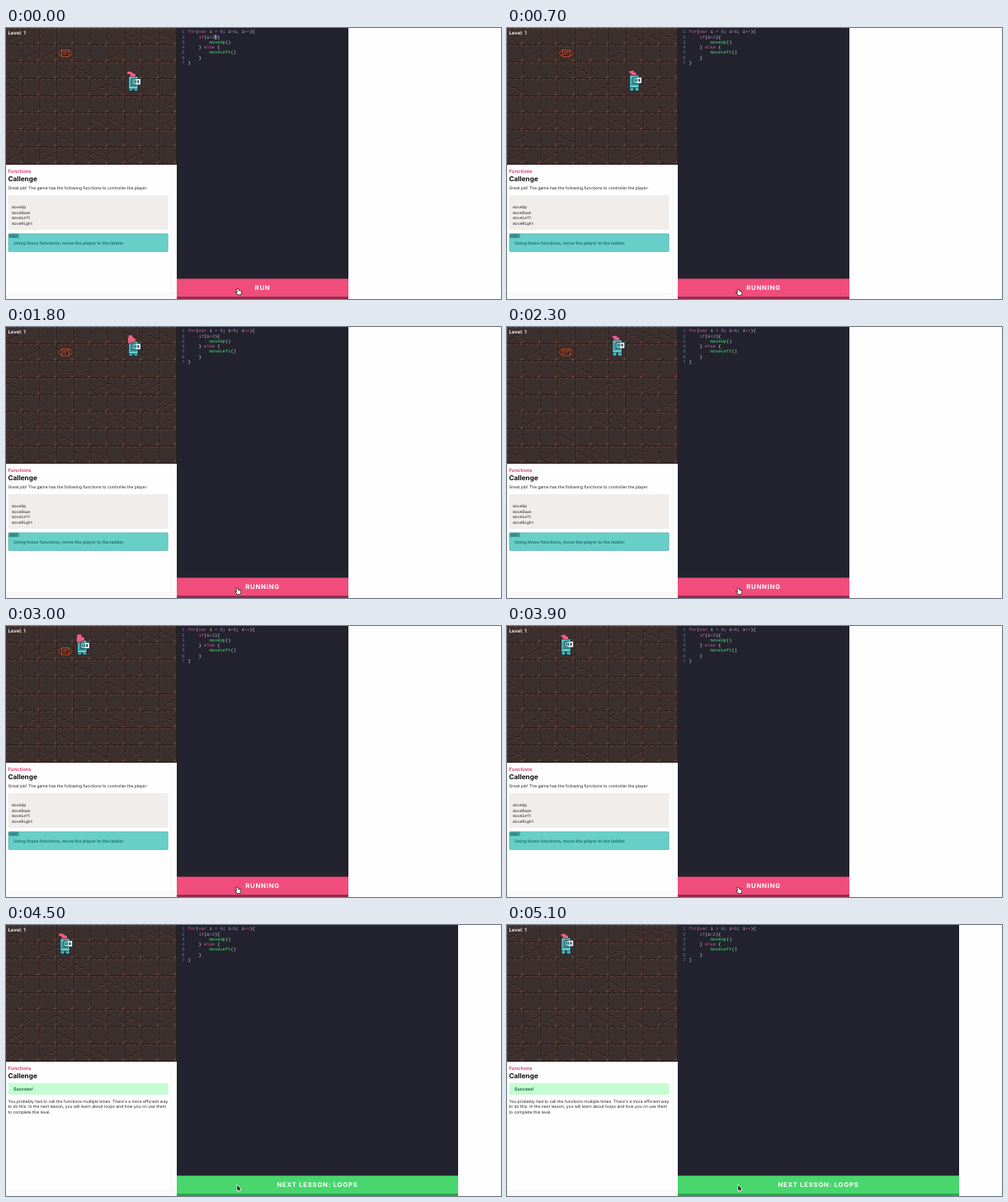
These frames come from a looping animation (600 by 329 pixels, 5.2 s). An HTML page with a canvas:

```html
<!DOCTYPE html>
<html lang="en">
<head>
<meta charset="utf-8">
<title>Coding lesson</title>
<style>
  html, body { margin: 0; width: 100%; height: 100%; overflow: hidden; background: #fff; }
  canvas { display: block; width: 600px; height: 329px; }
</style>
</head>
<body>
<canvas id="stage"></canvas>
<script>
const LOOP = 5200, CLICK = 600, FIRST_MOVE = 1000, MOVE_GAP = 500, DONE = 4000;
const TILE = 20.7, COLS = 10, ROWS = 8, MAP_W = 207, MAP_H = 166;
const SANS = 'Inter, sans-serif';
const CODE = '"Liberation Mono", monospace';
const MENLO = '"DejaVu Sans Mono", monospace';

const stage = document.getElementById('stage');
const dpr = window.devicePixelRatio || 1;
stage.width = 600 * dpr;
stage.height = 329 * dpr;
const screen = stage.getContext('2d');
let ctx = screen;

function rect(x, y, w, h, color) {
  ctx.fillStyle = color;
  ctx.fillRect(x, y, w, h);
}

function box(x, y, w, h, color, border) {
  ctx.beginPath();
  ctx.roundRect(x, y, w, h, 1);
  ctx.fillStyle = color;
  ctx.fill();
  if (border) {
    ctx.strokeStyle = border;
    ctx.lineWidth = 0.6;
    ctx.stroke();
  }
}

function trace(points, x = 0, y = 0) {
  ctx.beginPath();
  points.forEach(([dx, dy]) => ctx.lineTo(x + dx, y + dy));
}

function line(points, x, y, color, width) {
  trace(points, x, y);
  ctx.strokeStyle = color;
  ctx.lineWidth = width;
  ctx.stroke();
}

function shape(points, x, y, color, border) {
  trace(points, x, y);
  ctx.closePath();
  if (border) {
    ctx.strokeStyle = border;
    ctx.lineWidth = 1.4;
    ctx.stroke();
  }
  ctx.fillStyle = color;
  ctx.fill();
}

function text(str, x, y, font, color, align = 'left', spacing = 0) {
  ctx.font = font;
  ctx.textAlign = align;
  ctx.letterSpacing = spacing + 'px';
  ctx.textRendering = 'geometricPrecision';
  ctx.fillStyle = color;
  ctx.fillText(str, x, y);
}

function seeded(seed) {
  return () => {
    seed = (seed * 16807) % 2147483647;
    return seed / 2147483647;
  };
}

const CRACK = [[0, 6], [4, 7.5], [6, 10.5], [10, 10], [12, 13], [16, 14], [20, 18]];

function drawTile(x, y, rnd) {
  rect(x, y + TILE - 0.9, TILE, 0.9, '#231a19');
  rect(x + TILE - 0.8, y, 0.8, TILE, '#271d1c');
  // Broken, rust-coloured rims along the joints
  for (let i = 0; i < 3; i++) {
    rect(x + 1 + i * 7, y + 0.1, 4.5, 0.8, '#6a473d');
    rect(x + 0.1, y + 1 + i * 7, 0.7, 4, '#5b3f37');
  }
  rect(x + TILE - 4.5, y + TILE - 2.2, 3.5, 0.8, '#835344');
  rect(x + TILE - 2, y + TILE - 5, 0.8, 3, '#74493e');
  rect(x + 2, y + TILE - 3, 2, 0.8, '#241b1a');
  rect(x + 3 + rnd() * 13, y + 3 + rnd() * 12, 1.2, 0.8, '#523d37');
  if (rnd() < 0.36) {
    const flip = rnd() < 0.5;
    const crack = CRACK.map(([a, b]) => [flip ? TILE - a : a, b]);
    line(crack, x, y, '#201818', 1);
    line(crack, x, y + 0.9, '#70493d', 0.6);
  }
}

// Stone floor, painted once
function makeFloor() {
  const layer = document.createElement('canvas');
  layer.width = MAP_W * dpr;
  layer.height = MAP_H * dpr;
  ctx = layer.getContext('2d');
  ctx.scale(dpr, dpr);
  rect(0, 0, MAP_W, MAP_H, '#3c302e');
  const rnd = seeded(77);
  for (let row = 0; row < ROWS; row++) {
    for (let col = 0; col < COLS; col++) drawTile(col * TILE, row * TILE, rnd);
  }
  ctx = screen;
  return layer;
}

const floor = makeFloor();

function drawLadder() {
  const x = 3 * TILE, y = TILE;
  rect(x + 4, y + 4.6, 11.6, 11, '#281b19');
  for (const side of [-1, 1]) {
    const hook = [[5, -3.5], [7.5, -1.5], [8.3, 0], [7.5, 2], [5, 4]].map(([a, b]) => [a * side, b]);
    line(hook, x + 9.7, y + 9.6, '#281b19', 2.4);
    line(hook, x + 9.7, y + 9.6, '#a04a31', 1.1);
  }
  rect(x + 4.8, y + 5.2, 10, 9.6, '#b94d32');
  rect(x + 6, y + 6.4, 7.6, 7.2, '#35201c');
  rect(x + 7, y + 7.8, 5.6, 1.1, '#c65b3d');
  rect(x + 7, y + 10.4, 4.2, 1.1, '#b04d34');
}

// Idle cycle: vertical bob and plume outline per pose
const SWEPT = [[2, -6], [6, -6.2], [9, -4.2], [12, -2.8], [12, 0], [6, 0], [5.5, -2.6], [2, -3.4]];
const RAISED = [[4, -7.5], [8, -7.5], [9, -4.5], [12, -3.5], [12, 0], [3, 2.5], [3, -3]];
const SHORT = [[3.5, -5], [9, -5.5], [9, -3.6], [12, -2.8], [12, 0], [5.5, 0], [5.5, -2.4], [3.5, -2.6]];
const POSES = [
  { bob: 0, plume: SWEPT },
  { bob: -1, plume: SWEPT },
  { bob: 0, plume: RAISED },
  { bob: -1.6, plume: SHORT }
];

function drawPlayer(col, row, t) {
  const { bob, plume } = POSES[Math.floor(t / 100) % 4];
  const x = col * TILE, y = row * TILE, top = y - 3.2 + bob;
  const part = (dx, dy, w, h, color) => rect(x + dx, top + dy, w, h, color);
  rect(x + 3.4, y + 10, 12.4, 5, '#1d2429');
  rect(x + 4.4, y + 10, 4, 4, '#4db4b9');
  rect(x + 10.4, y + 10, 4.4, 4, '#4db4b9');
  part(3.2, -0.6, 12.4, 16, '#1d2c32');
  part(4.2, 0.2, 10.4, 14.6, '#62d2d4');
  part(5.4, 3, 1.2, 8.6, '#2d7f88');
  part(5.4, 11, 8.4, 1.1, '#246a73');
  part(7.4, 2.2, 11.4, 8.2, '#1a333b');
  part(8.4, 3.2, 9.6, 6.2, '#74dadb');
  part(12.6, 3, 5.4, 6.6, '#f3fbfb');
  part(9.8, 4.5, 1.1, 3.4, '#20434b');
  part(12, 4.5, 1.1, 3.4, '#20434b');
  part(14.4, 4.5, 2, 3.4, '#28434d');
  shape(plume, x, top, '#ec5f83', '#38222a');
}

const PINK = '#e75c9c', PLAIN = '#dfdfe6', VIOLET = '#a98be0', GREEN = '#4ee37b';
const SOURCE = [
  [0, ['for', PINK], ['(', PLAIN], ['var', PINK], [' i ', PLAIN], ['=', PINK], [' ', PLAIN], ['0', VIOLET],
    ['; i', PLAIN], ['<', PINK], ['6', VIOLET], ['; i', PLAIN], ['++', PINK], ['){', PLAIN]],
  [4, ['if', PINK], ['(i', PLAIN], ['<', PINK], ['2', VIOLET], ['){', PLAIN]],
  [8, ['moveUp', GREEN], ['()', PLAIN]],
  [4, ['} ', PLAIN], ['else', PINK], [' {', PLAIN]],
  [8, ['moveLeft', GREEN], ['()', PLAIN]],
  [4, ['}', PLAIN]],
  [0, ['}', PLAIN]]
];

function drawEditor(t) {
  const done = t >= DONE, left = MAP_W, width = done ? 341 : 208;
  rect(left, 0, width, 329, '#22232e');
  if (t < CLICK) rect(252.8, 8, 2.8, 5.4, '#4a4b58');
  const charWidth = 3.25, font = '5.42px ' + CODE;
  SOURCE.forEach(([indent, ...runs], i) => {
    const y = 6.3 + i * 6.25;
    text(String(i + 1), 216.6, y, font, '#7d7e89', 'right');
    let column = indent;
    for (const [word, color] of runs) {
      text(word, 220.4 + column * charWidth, y, font, color);
      column += word.length;
    }
  });
  if (t < CLICK) rect(253, 8, 0.5, 5.4, '#d8d8de');

  rect(left, 304.5, width, 24.5, done ? '#2ba44e' : '#8f2a4c');
  rect(left, 304.5, width, 21.7, done ? '#48d66d' : '#f04d7c');
  const label = done ? 'NEXT LESSON: LOOPS' : t < CLICK ? 'RUN' : 'RUNNING';
  text(label, left + width / 2, 318.2, '700 7.7px ' + SANS, '#fff', 'center', 0.78);
}

function drawLesson(t) {
  rect(0, MAP_H, MAP_W, 329 - MAP_H, '#fefefe');
  rect(200, MAP_H, 0.5, 156, '#ededed');
  rect(0, 322, MAP_W, 0.6, '#e6e6e6');
  rect(0, 322.6, MAP_W, 6.4, '#fafafa');
  const body = '5px ' + SANS, bold = '700 5.25px ' + SANS;
  text('Functions', 2.6, 175.9, '600 5.9px ' + SANS, '#d92f6b');
  text('Callenge', 2.5, 186, '700 8.2px ' + SANS, '#111');

  if (t >= DONE) {
    box(2.7, 192, 193.8, 14, '#c3fdd1');
    text('Success!', 9, 200.8, bold, '#1c6638');
    ['You probably had to call the functions multiple times. There\'s a more efficient way',
      'to do this. In the next lesson, you will learn about loops and how you cn use them',
      'to complete this level.'
    ].forEach((row, i) => text(row, 2.5, 216.1 + i * 6.2, body, '#222'));
    return;
  }

  text('Great job! The game has the following functions to controller the player:', 2.5, 196.4, body, '#222');
  box(2.7, 203, 193.8, 42, '#f0edeb');
  ['moveUp', 'moveDown', 'moveLeft', 'moveRight'].forEach((name, i) =>
    text(name, 7.3, 219 + i * 6.7, '4.65px ' + MENLO, '#222'));
  box(3, 249.8, 193.2, 21.6, '#67cec8', '#50aaa8');
  box(3, 249.8, 12.7, 5.2, '#3f9997');
  text('HINT', 9.3, 253.8, '600 3.5px ' + SANS, '#26787a', 'center');
  text('Using these functions, move the player to the ladder.', 9, 262.6, bold, '#267678');
}

const HAND = [[-2, -3], [-0.6, -3.2], [0.2, -1], [3, -0.6], [3, 2], [2.2, 3.4], [-1, 3.4], [-3, 0.6], [-1.2, 0.6]];
const ARROW = [[0, 0], [0, 6], [1.4, 4.8], [2.3, 6.8], [3.3, 6.3], [2.5, 4.4], [4.2, 4.3]];

function drawPointer(t) {
  if (t >= DONE) shape(ARROW, 280.3, 316.3, '#111', '#e9f5ec');
  else if (t < CLICK) shape(HAND, 282, 320.2, '#fff', '#222');
  else shape(HAND, 281.3, 320.8, '#fff', '#222');
}

function draw(t) {
  ctx.setTransform(dpr, 0, 0, dpr, 0, 0);
  rect(0, 0, 600, 329, '#fefefe');
  ctx.drawImage(floor, 0, 0, MAP_W, MAP_H);
  const moves = Math.max(0, Math.min(6, Math.floor((t - FIRST_MOVE) / MOVE_GAP) + 1));
  if (moves < 6) drawLadder();
  drawPlayer(7 - Math.max(0, moves - 2), 3 - Math.min(2, moves), t);
  text('Level: 1', 2.4, 7.8, '600 6px ' + SANS, '#fff');
  drawLesson(t);
  drawEditor(t);
  drawPointer(t);
}

const start = performance.now();
function tick() {
  draw((performance.now() - start) % LOOP);
  requestAnimationFrame(tick);
}
tick();
</script>
</body>
</html>
```
